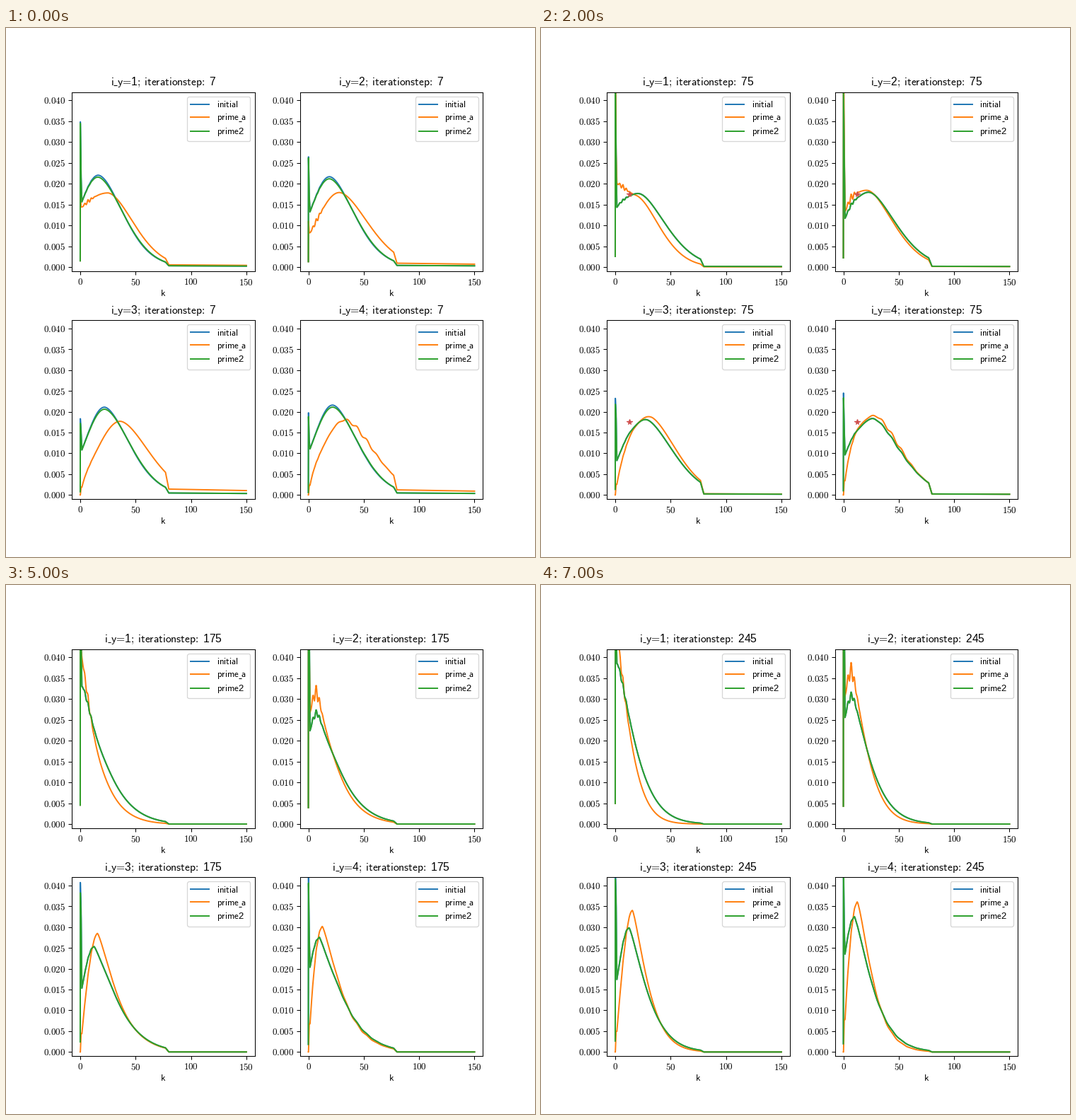
Write a matplotlib script that moves like this. It is 748 px wide and 748 px high and loops after 8000 ms.

```python
import numpy as np
import matplotlib.pyplot as plt
from matplotlib.animation import FuncAnimation
from matplotlib.lines import Line2D
from matplotlib.transforms import IdentityTransform

plt.rcParams["mathtext.fontset"] = "cm"
plt.rcParams["font.family"] = "Liberation Sans"
SIZE, DPI = 748, 93.5
PT = DPI / 72
TITLE_PAD = 7.2

STEPS = [7, 42, 75, 105, 140, 175, 210, 245]
START, MIDDLE, END = 7, 42, 245

# Humps at three key steps, in units of 1e-4: height, peak place and spike tip
# of each panel, then left width, right width and fall-off power.
GREEN = {
    START: ([216, 212, 206, 211], [16, 19, 22, 22], [345, 262, 172, 188], 25.5, 33.3, 1.75),
    MIDDLE: ([185, 187, 187, 190], [22, 24, 29, 28], [283, 258, 132, 143], 27.5, 35.6, 1.75),
    END: ([385, 308, 298, 324], [2, 8, 12.5, 10], [800, 800, 415, 440], 15, 21.3, 1.3),
}
ORANGE = {
    START: ([178, 179, 177, 180], [25, 28, 36, 33], [170, 110, 0, 0], 30, 37.3, 1.75),
    MIDDLE: ([185, 192, 196, 198], [19, 23, 33, 30], [382, 460, 0, 0], 28, 33.8, 1.75),
    END: ([480, 368, 342, 366], [0, 7.5, 15.5, 12.5], [900, 900, 0, 0], 14, 17.8, 1.3),
}
RIPPLE = [0.03, 0.055, 0.01, 0.01]
LOW = [15, 13, 8, 6]
SHOULDER = [0.62, 0.65, 0.84, 0.66]
BLUE_TIP = [1.01, 1.01, 1.065, 1.05]

BODY = np.linspace(1.5, 77, 152)
K = np.r_[0, 0.12, 0.8, BODY, 80, 150]


def bell(center, width):
    return np.exp(-((BODY - center) / width) ** 2)


def progress(step):
    """Share of the final shape, 0 at the middle key and 1 at the end."""
    def rise(n):
        return 1 - np.exp(-(max(n - MIDDLE, 0) / 105) ** 1.7)
    return rise(step) / rise(END)


def hump(key, p, orange):
    heights, peaks, _, left, right, power = key
    if orange and p == 0:
        left, right = 1.7 * left, 0.9 * right
    d = BODY - peaks[p]
    fall = np.where(d < 0, (np.abs(d) / left) ** 2, (np.abs(d) / right) ** power)
    return heights[p] * np.exp(-fall)


def curve(step, p, orange):
    """Spike tip and smooth body of one line."""
    keys = ORANGE if orange else GREEN
    c = progress(step)
    if step < MIDDLE:
        a, b, w = START, MIDDLE, (step - START) / (MIDDLE - START)
    else:
        a, b, w = MIDDLE, END, c
    y = (1 - w) * hump(keys[a], p, orange) + w * hump(keys[b], p, orange)
    y *= 1 - 0.36 * c * (1 - c) * bell(15, 10)
    tip = keys[a][2][p] + (keys[b][2][p] - keys[a][2][p]) * w ** 0.6

    ripple = RIPPLE[p] * bell(7, 4) * np.cos(2 * np.pi * (BODY - 7) / 3)
    if p == 3:
        ripple += 0.03 * bell(50, 18) * np.cos(2 * np.pi * (BODY - 35) / 9)
    if not orange:
        ripple *= 0.6 * (1 - np.exp(-step / 40))
    elif p > 1:
        y *= 1 - np.exp(-BODY / 3)
    return tip, y * (1 + ripple)


def whole(step, p, tip, y, shoulder):
    low = LOW[p] * (1 + 2.3 * progress(step) ** 0.6) if tip else 0
    tail = 0.26 * y[-1] * np.exp((START - step) / 60)
    return np.r_[low, tip, max(shoulder * tip, y[0]), y, tail, 0.75 * tail] * 1e-4


def panel(step, p):
    """Values of the blue, orange and green lines."""
    tip, green = curve(step, p, False)
    tip_o, orange = curve(step, p, True)
    blue = green + (5 * bell(20, 13) - 2 * bell(55, 14)) * START / step
    return (whole(step, p, BLUE_TIP[p] * tip, blue, SHOULDER[p]),
            whole(step, p, tip_o, orange, 0.5),
            whole(step, p, tip, green, SHOULDER[p]))


def sans(s):
    return r"$\mathsf{%s}$" % s


def roman(fmt):
    return lambda v, _: r"$\mathrm{%s}$" % format(v, fmt)


def heading(p, step):
    return (r"$\mathsf{i\hspace{0.41}y}\hspace{-0.2}=\hspace{-0.2}\mathdefault{%d}\mathsf{;"
            r"\hspace{0.245}iterationstep\hspace{-0.2}:}\hspace{0.3}\mathdefault{%d}$"
            % (p + 1, step))


fig = plt.figure(figsize=(8, 8), dpi=DPI, facecolor="white")


def underscore():
    return fig.add_artist(Line2D([], [], color="black", lw=0.8, solid_capstyle="butt",
                                 transform=IdentityTransform()))


def place(line, x, y, em):
    line.set_data([x, x + 0.3 * em], [y, y])


axes, lines, stars, rules = [], [], [], []
for p in range(4):
    row, col = divmod(p, 2)
    box = np.array([93.2 + 322.6 * col, 404.1 - 322.3 * row, 258.4, 253.2])
    ax = fig.add_axes(box / SIZE)
    axes.append(ax)
    lines.append([ax.plot([], [], color=c, lw=1.5, label=name)[0]
                  for c, name in (("#1f77b4", sans("initial")),
                                  ("#ff7f0e", sans(r"prime\hspace{0.41}a")),
                                  ("#2ca02c", r"$\mathsf{prime}\mathdefault{2}$"))])
    stars.append(ax.plot([12.5], [0.0175], "*", color="#d0504e", ms=6)[0])
    ax.set_xlim(-7.5, 157.5)
    ax.set_ylim(-0.001, 0.042)
    ax.set_xticks([0, 50, 100, 150])
    ax.set_yticks(np.arange(9) * 0.005)
    ax.xaxis.set_major_formatter(roman(".0f"))
    ax.yaxis.set_major_formatter(roman(".3f"))
    ax.set_xlabel(sans("k"), labelpad=1.2)
    ax.legend(loc="upper right", labelspacing=0.3)
    rules.append(underscore())

fig.draw_without_rendering()
for ax in axes:
    box = ax.get_legend().get_texts()[1].get_window_extent()
    place(underscore(), box.x0 + 2.4 * 10 * PT, box.y0 + 3, 10 * PT)


def update(i):
    step = STEPS[i]
    for p, ax in enumerate(axes):
        for line, y in zip(lines[p], panel(step, p)):
            line.set_data(K, y)
        stars[p].set_visible(step == 75)
        title = ax.set_title(heading(p, step), fontsize=12, pad=TITLE_PAD)
        em = 12 * PT
        place(rules[p], title.get_window_extent().x0 + 0.3 * em,
              ax.bbox.y1 + TITLE_PAD * PT, em)
    return []


anim = FuncAnimation(fig, update, frames=len(STEPS), interval=1000, repeat=True,
                     repeat_delay=0, blit=False)
plt.show()
```
